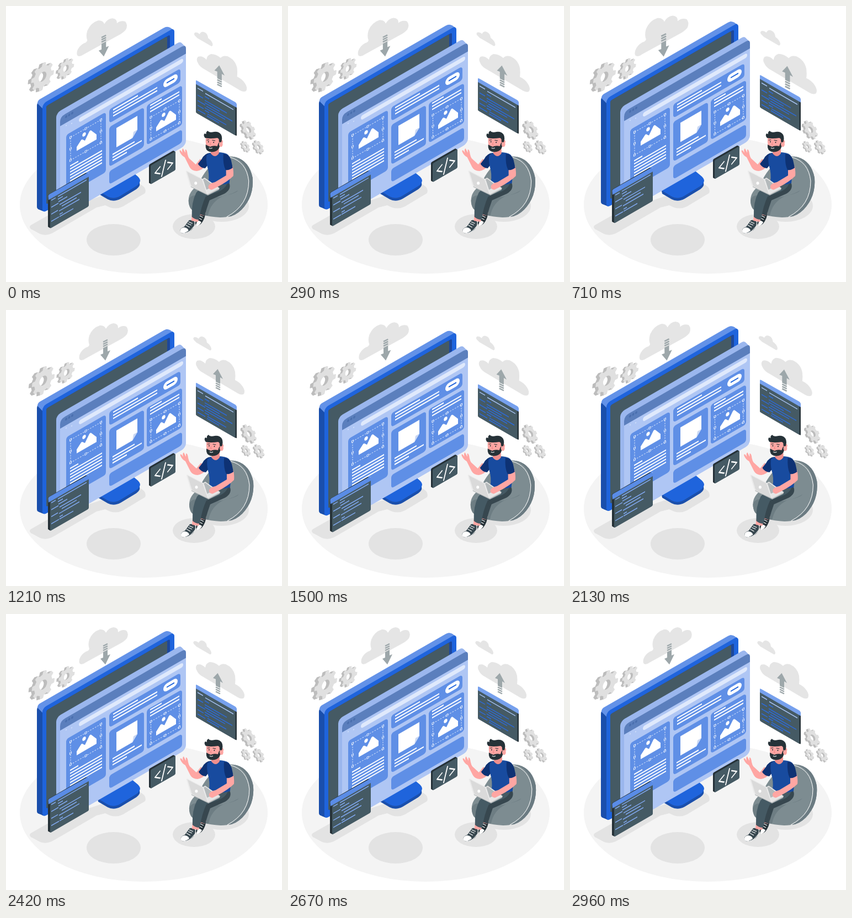
Animation of 500 by 500 pixels, one loop 3000 ms. Source, as an HTML page:

```html
<!DOCTYPE html>
<html lang="en">
<head>
<meta charset="utf-8">
<title>Web development</title>
<style>
html, body { margin: 0; width: 100%; height: 100%; overflow: hidden; background: #fff; }
svg { display: block; width: 100vw; height: 100vh; }
</style>
</head>
<body>
<svg id="stage" viewBox="0 0 500 500" fill="none" stroke-linejoin="round"></svg>
<script>
const BLUE = '#1f64dc', DEEP = '#1a4fac', CARD = '#5f8fe6', PALE = '#afc6f4';
const SLATE = '#455a64', INK = '#263238', SKIN = '#ffa6a3', SHADE = '#e3e3e3';

const path = (d, fill, extra = '') => `<path d="${d}" fill="${fill}" ${extra}/>`;
const line = (d, color, width, extra = '') =>
  `<path d="${d}" stroke="${color}" stroke-width="${width}" ${extra}/>`;
const box = (x1, y1, x2, y2, r, fill, extra = '') =>
  `<rect x="${x1}" y="${y1}" width="${x2 - x1}" height="${y2 - y1}" rx="${r}" fill="${fill}" ${extra}/>`;
const oval = (x, y, rx, ry, fill) => `<ellipse cx="${x}" cy="${y}" rx="${rx}" ry="${ry}" fill="${fill}"/>`;
const group = (transform, body) => `<g transform="${transform}">${body}</g>`;
const rising = body => group('skewY(-30)', body);
const falling = body => group('skewY(30)', body);
const ROUND = 'stroke-linecap="round"';

// Rows of [x1, x2, y] drawn as level strokes.
const rows = (list, color, width) =>
  line(list.map(([a, b, y]) => `M${a} ${y}H${b}`).join(''), color, width);

// Stacks copies of a shape from (dx, dy) towards its front.
function extrude(shape, dx, dy, steps = 8) {
  let out = '';
  for (let i = steps; i > 0; i--) out += group(`translate(${dx * i / steps} ${dy * i / steps})`, shape);
  return out;
}

function gear(cx, cy, r, tilt, dx, dy) {
  const teeth = 8, pts = [];
  for (let i = 0; i < teeth; i++)
    for (const [offset, k] of [[-.3, .78], [-.19, 1], [.19, 1], [.3, .78]]) {
      const a = (i + offset + .2) * 2 * Math.PI / teeth;
      pts.push(`${(r * k * Math.cos(a)).toFixed(2)} ${(r * k * Math.sin(a)).toFixed(2)}`);
    }
  const h = r * .34;
  const d = `M${pts.join('L')}ZM${h} 0A${h} ${h} 0 1 0 ${-h} 0A${h} ${h} 0 1 0 ${h} 0Z`;
  const face = fill => group(`matrix(.866 ${tilt} 0 1 ${cx} ${cy})`, path(d, fill, 'fill-rule="evenodd"'));
  return extrude(face('#bdbdbd'), dx, dy, 5) + face('#e0e0e0');
}

const floor =
  oval(249.5, 360, 224.5, 125, '#f4f4f4') +
  path('M45 397L75 380L150 352L240 322Q256 328 252 339L212 363Q197 371 180 361L164 365L90 408Q75 418 62 413L45 404Q41 400 45 397Z', SHADE) +
  oval(195, 423.5, 49, 28.5, SHADE) + oval(340.5, 399.5, 38.5, 22.5, SHADE) + oval(391, 362, 49, 29, SHADE);

const stand =
  path('M166 335L212 312L240 316Q243 320 242 325Q241 328 236 332L208 349Q195 356 184 350L167 340Z', DEEP) +
  path('M166 334L210 306L227 299L239 309Q245 315 242 320Q240 324 235 327L207 344Q195 351 184 345Z', BLUE);

const monitor =
  rising(extrude(box(66, 216, 305, 414, 7, DEEP), -10, -10)) +
  path('M57 177Q57 172 61 169.500L286 40Q292 36.500 298 40L305 46Q300 45 296 49L72 179Q67 182 66 186Z', '#6392e8') +
  rising(box(66, 216, 305, 414, 7, BLUE) + box(73, 224, 297, 402, 3, '#1c479c') + box(73, 224, 292, 402, 3, SLATE));

function picture(x, y, w, h, inset) {
  let handles = '';
  for (const i of [0, .5, 1])
    for (const j of [0, .5, 1])
      if (i !== .5 || j !== .5)
        handles += box(x + w * i - 1.6, y + h * j - 1.6, x + w * i + 1.6, y + h * j + 1.6, 0, CARD, 'stroke="#fff" stroke-width=".8"');
  return box(x, y, x + w, y + h, 0, 'none', 'stroke="#fff" stroke-width=".8" stroke-dasharray="2.4 2"') + handles +
    group(`translate(${x + inset} ${y + 7})`,
      path('M0 24V17L8 9Q10 8 12 11L15 14L23 2Q25 0 27 3L36 15V24Z', '#fff') + oval(13.5, 2, 3.2, 3.5, '#fff'));
}

const browser = rising(
  extrude(box(98, 258, 326, 441, 8, '#9bb7ee'), -7, -11) +
  box(98, 258, 326, 441, 8, PALE) +
  path('M98 275V267Q98 258 107 258H318Q326 258 326 266V275Z', '#5b7fbd') +
  [109, 114.5, 120].map(x => oval(x, 264, 1.9, 2.2, '#4a6fae')).join('') +
  rows([[108, 110, 280], [118, 120, 282]], '#d5e2fa', 1.5) +
  line('M136 284H317', '#dfe9fc', 8, ROUND) +
  box(109, 297, 181, 406, 5, CARD) + box(187, 296, 316, 321, 5, CARD) +
  box(187, 328, 250, 400, 5, CARD) + box(255, 328, 319, 400, 5, CARD) + box(187, 408, 319, 432, 5, CARD) +
  picture(117, 306, 55, 41.5, 11) + picture(262.5, 353.5, 51.5, 40, 9.5) +
  rows([[116, 131, 357.5], [116, 174, 363], [116, 174, 368.5], [116, 174, 374], [116, 174, 379.5],
    [116, 174, 385], [116, 150, 390.5],
    [194, 239, 300.8], [194, 274, 306.4], [194, 274, 312],
    [261, 282, 331.6], [261, 314, 337.2], [261, 314, 342.8],
    [193, 233, 381], [193, 246, 386.5], [193, 219, 392]], '#fff', 2.3) +
  box(285, 301, 311, 315, 7, '#fff') + line('M291 308H305', BLUE, 2.2) +
  path('M200 337H238V362L229 372H200Z', '#fff') + path('M229 372L231 362H238Z', '#c9d7f3')
);

const codePanel = rising(
  extrude(box(80, 391, 150, 450, 2, INK), -4, -4.5) +
  box(80, 391, 150, 450, 2, SLATE) +
  path('M76.5 390Q76 387 79 387L148 388Q150 389 150 392V396.500H77Z', '#5a8ce6') +
  rows([[82, 90, 400], [94, 146, 400], [94, 103, 405], [95, 111, 410], [82, 95, 412.5],
    [97, 136, 416.5], [101, 128, 421.5], [82, 94, 425], [96, 133, 427.5], [97, 103, 434],
    [82, 96, 438], [97, 122, 438]], '#82aaf2', 1.7)
);

const sidePanel = falling(
  box(344, -63, 418, -5, 2, INK) + box(344, -63, 415.5, -5, 2, SLATE) +
  path('M344 -56.500V-62Q344 -64 346 -64L415 -65Q418 -65 418 -61V-56.500Z', '#76a0ed') +
  rows([[347, 357, -51], [361, 412, -49.5]], '#a9c5f7', 1.6) +
  rows([[360, 368, -43.5], [347, 357, -38.5], [360, 400, -36.5], [360, 387, -32], [347, 361, -28.5],
    [363, 410, -27.5], [360, 397, -23], [347, 358, -20], [360, 368, -18.5], [365, 399, -14.5],
    [347, 361, -12], [364, 386, -10.5]], '#2b6be0', 1.6)
);

const tagPanel = rising(
  extrude(box(262, 441, 307, 475, 2, INK), -3, -3.5) + box(262, 441, 307, 475, 2, SLATE) +
  line('M279 453L270 459L279 465.500M282 472L289 447M293 453L302 459.500L293 465.500', '#fff', 2.1, ROUND)
);

const ARROW = '#9da7aa', CLOUD = '#e5e5e5';
const clouds =
  path('M137 91Q131 91 133 82Q136 73 145 68Q150 67 151 63Q148 56 151 46Q157 32 170 28Q178 27 181 34Q186 25 195 24Q204 25 203 33Q210 27 218 30Q223 36 219 44Q214 50 206 54L144 88Q140 91 137 91Z', CLOUD) +
  path('M346 103Q342 97 346 92Q353 89 361 97Q362 89 369 87Q378 87 386 94Q390 89 398 91Q412 97 415 112Q416 120 415 127Q424 131 429 139Q434 147 431 152Q427 155 420 151L354 112Q348 108 346 103Z', CLOUD) +
  path('M340 54Q338 50 342 49Q346 49 349 52Q352 46 358 49Q363 51 364 59Q371 64 372 70Q372 74 369 73L345 59Z', CLOUD) +
  path('M171 81L176 79V69L184 65V75L189 73L180 91.500Z', ARROW) +
  line('M176 58L184 54M176 62L184 58M176 66L184 62', ARROW, 2.4) +
  path('M383.5 107L393 125L388 122V134L380 130V118L375 116Z', ARROW) +
  line('M380 132.5L388 136.5M380 136.5L388 140.5M380 140.5L388 144.5', ARROW, 2.4);

const gears =
  gear(66.5, 128, 24, -.5, -6, 2) + gear(109, 113, 17, -.5, -4, 1.5) +
  gear(440, 224, 15, .5, -3.5, 1.5) + gear(434.5, 254.5, 9, .5, -2, 1) + gear(458, 255.5, 11, .5, -2.5, 1);

const chair =
  path('M331 352Q331 336 348 325Q362 291 388 277Q400 270 417 274Q441 281 447 311Q450 345 427 369Q411 383 388 383Q350 381 335 367Q331 361 331 352Z', '#7d8c91') +
  path('M412 273Q438 282 441 317Q441 362 402 382Q415 381 427 369Q450 345 447 311Q441 281 417 274Z', '#6b7b82') +
  line('M406 274Q436 282 440 317Q440 361 400 382', '#fff', 1) +
  path('M331 352Q334 340 352 344Q391 352 421 334Q416 340 394 344Q370 356 366 380Q343 376 335 367Q331 361 331 352Z', '#6d7d83');

const shoes =
  path('M343 393L349 376Q357 370 361 377Q361 385 354 394Q347 400 344 397Z', INK) +
  path('M344 397Q347 391 345 388Q353 389 354 392Q348 401 344 397Z', '#fff') +
  line('M349 384L355 387M351 380L357 383', '#fff', 1.1) +
  path('M316 407Q315 403 323 400L332 388Q340 387 342 392Q342 400 336 406Q328 412 321 412Q316 411 316 407Z', '#37474f') +
  path('M316 407Q316 402 323 401Q330 402 331 407Q325 412 319 411Q316 410 316 407Z', '#fff') +
  line('M316 409Q324 415 334 407L341 399', '#fff', 1) +
  line('M326 397L333 401M329 394L336 397M331 391L338 394', '#fff', 1.1);

const body =
  path('M337 379L350 383L348 391L336 389Z', SKIN) +
  path('M350 371L362 374L359 380L350 378Z', SKIN) +
  path('M403 317Q411 331 396 340L369 352Q364 366 360 380L348 376L353 344Z', '#37474f') +
  path('M369 327L402 318Q399 333 378 339L362 345Q354 362 350 387Q342 387 337 382Q336 355 345 338Q354 326 369 327Z', SLATE) +
  // Raised arm
  path('M352 277L365 287Q355 298 346 299Q337 299 333 292L324 274Q318 271 315 264Q314 260 317 262L320 266Q318 260 321 258L325 266L325 260Q328 259 329 268Q330 273 332 276L344 287Z', SKIN) +
  path('M370 266Q360 267 355 277L348 286Q352 293 361 294L371 282Z', '#0e3274') +
  path('M364 270Q371 264 382 265Q398 265 403 270Q409 284 405 321Q386 327 367 319Q369 303 365 291Q362 278 364 270Z', '#184b9f') +
  path('M372 257H386V267Q379 277 371 267Z', '#ef8f8d');

const head =
  path('M362 240Q361 260 371 263Q385 264 389 251Q396 247 392 243L388 237L365 236Z', SKIN) +
  path('M362 251Q361 262 369 264Q381 266 386 258L391 244Q385 246 383 254Q376 252 370 255Q365 253 362 251Z', INK) +
  oval(389.5, 250.5, 3.4, 4.8, SKIN) +
  path('M361 239Q357 234 360 231L363 232Q362 228 366 226Q368 230 377 228Q386 227 390 233Q393 239 390 247L386 246Q387 240 383 239Q370 241 361 239Z', INK) +
  oval(367, 246, .9, 1.3, INK) + oval(376.5, 247, .9, 1.3, INK) +
  line('M364 243L368 242.500M374 243L379 244', INK, 1.1, ROUND) +
  line('M371 247L369.5 251L372 251.500', '#e97f80', .9) +
  line('M368 257Q371 259 374 257', '#fff', 1.2);

const laptop =
  path('M335 326L360 312L387 330L386 333L366 343L335 328Z', '#bcbfc0') +
  path('M335 326L360 311L387 330L366 341Z', '#e6e6e6') +
  path('M344 322L360 313L378 326L363 333Z', '#b4b9bb') +
  path('M326 300Q326 297 329 299L354 312Q357 313 358 316L366 341L336 327Q334 326 333 324Z', '#ebebeb') +
  path('M328 300L355 314L364 340L336 326Z', '#dadada') +
  oval(344, 321, 2.5, 2.7, '#fff');

const nearArm =
  path('M399 292L411 290Q413 302 412 308Q402 318 383 328L373 333Q366 332 367 326Q369 321 379 319L399 307Z', SKIN) +
  path('M394 268Q404 267 408 279L411 293Q405 298 398 297Q393 287 394 268Z', '#0e3274');

document.getElementById('stage').innerHTML =
  floor + stand +
  `<g class="float">${monitor}${browser}${codePanel}${tagPanel}</g>` +
  `<g class="beat">${clouds}</g>` +
  `<g class="float">${sidePanel}</g>` +
  `<g class="shake">${gears}${chair}${shoes}${body}${head}${laptop}${nearArm}</g>`;

const FLOAT = [[0, 0], [.5, -10], [1, 0]];
const BEAT = [[0, 1], [.1, 1.1], [.3, 1], [.4, 1], [.5, 1.1], [.6, 1], [1, 1]];
const SHAKE = [[0, 0], [.1, -1], [.2, 2], [.3, -4], [.4, 4], [.5, -4], [.6, 4], [.7, -4], [.8, 2], [.9, -1], [1, 0]];

function track(keys, p) {
  const i = Math.max(1, keys.findIndex(([at]) => at >= p));
  const [t0, a] = keys[i - 1], [t1, b] = keys[i];
  return a + (b - a) * (p - t0) / (t1 - t0);
}

const move = (name, transform) =>
  document.querySelectorAll('.' + name).forEach(g => g.setAttribute('transform', transform));

// Two identical 1.5 s cycles per loop, stepped at 24 pictures a second.
function render(ms) {
  const step = Math.floor((ms + 5) * .024) + 1;
  const p = step % 36 / 36;
  move('float', `translate(0 ${track(FLOAT, p)})`);
  move('beat', `translate(283 90) scale(${track(BEAT, p)}) translate(-283 -90)`);
  move('shake', `translate(${track(SHAKE, p)} 0)`);
}

const start = performance.now();
function tick() {
  render((performance.now() - start) % 3000);
  requestAnimationFrame(tick);
}
render(0);
requestAnimationFrame(tick);
</script>
</body>
</html>
```
